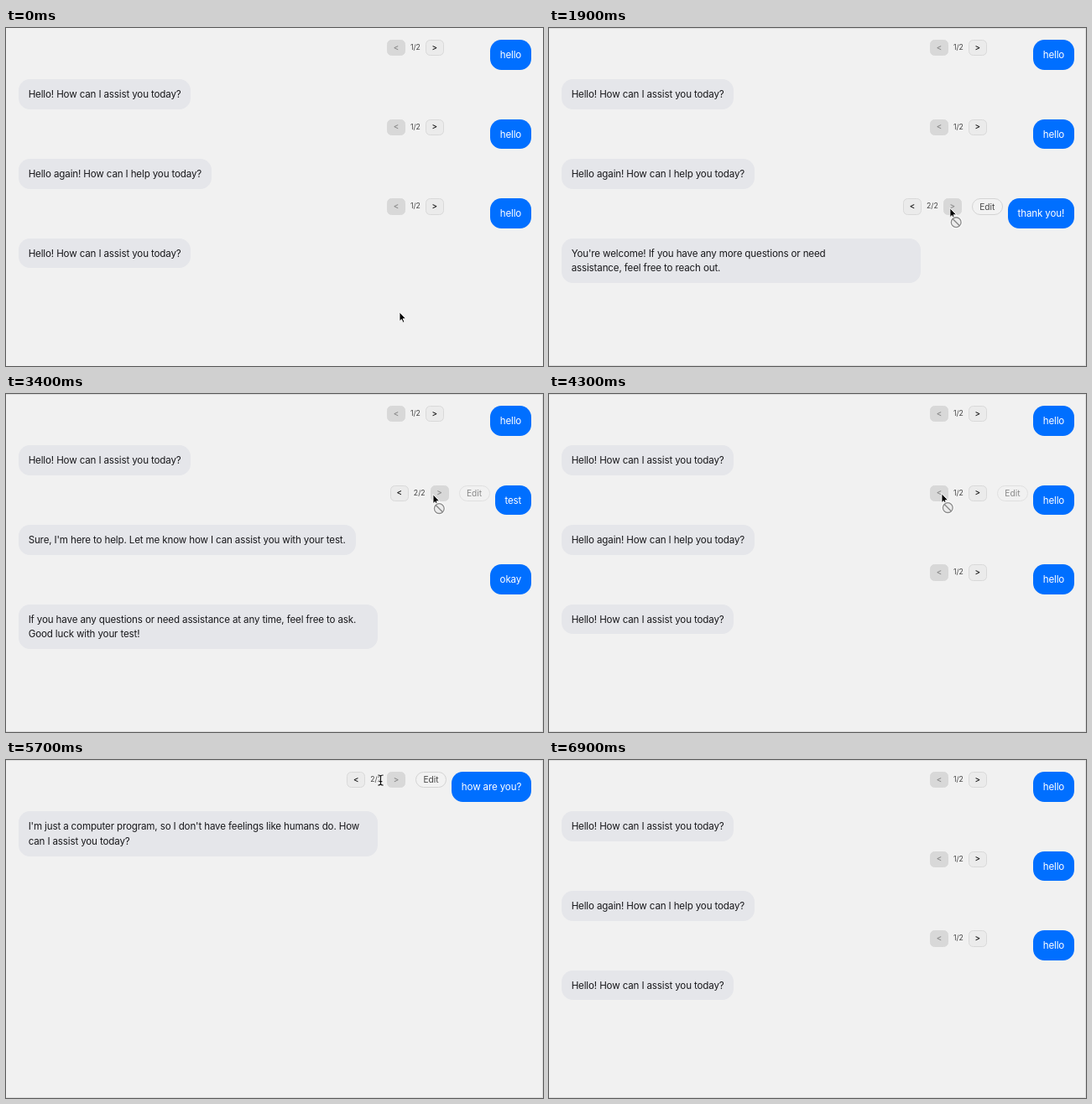
An HTML page that plays this animation: 640 by 403 pixels, repeating every 7700 ms.

```html
<!DOCTYPE html>
<html lang="en">
<head>
<meta charset="utf-8">
<title>Chat branches</title>
<style>
  html, body { margin: 0; width: 100%; height: 100%; overflow: hidden; }
  body { position: relative; background: #f1f1f1; color: #18181b; font: 11.6px/17.76px Inter, sans-serif; letter-spacing: -.0127em; cursor: default; }
  #chat { box-sizing: border-box; width: 640px; height: 403px; padding: 14px 14px 0 14.8px; }
  #chat.framed { box-shadow: inset -1px 1px #dcdcdc, inset 0 -1px #dcdcdc; }
  .mine, .reply { width: max-content; margin-bottom: 11.84px; }
  .mine { display: flex; align-items: flex-start; margin-left: auto; }
  .bubble { box-sizing: border-box; padding: 9.88px 11.84px 7.88px; border-radius: 13.4px; white-space: pre; }
  .mine .bubble { background: #006fff; color: #fff; }
  .reply { background: #e5e6ea; }
  .reply.wide { width: 428px; }
  button { box-sizing: border-box; height: 19.2px; padding: 0; border: 1px solid #d9d9d9; background: #ebebeb; color: #111; font: 500 9.8px/1 Inter, sans-serif; }
  .step { width: 22px; border-radius: 5.5px; }
  .step.hover { background: #d9d9d9; border-color: #d2d2d2; }
  .step:disabled { background: #d8d8d8; border-color: #d8d8d8; color: #878787; }
  .count { margin: 0 6px; font-size: 8.7px; line-height: 19.2px; letter-spacing: 0; color: #444; }
  .edit { width: 37px; margin: 0 6px 0 12px; border-color: #d4d4d4; border-radius: 10px; background: #f2f2f2; color: #444; font-weight: 400; font-size: 10.2px; opacity: 0; }
  #pointer { position: absolute; left: 0; top: 0; width: 1px; height: 1px; overflow: visible; pointer-events: none; }
</style>
</head>
<body>
<div id="chat"></div>
<svg id="pointer" fill="none" stroke-linejoin="round" stroke-linecap="round">
  <g id="arrow">
    <path d="M0 0V10.6L2.4 8.4L4.1 12.2L5.9 11.4L4.2 7.7H7.4Z" fill="#000" stroke="#fff" stroke-width=".9"/>
    <g id="denied">
      <circle cx="7.3" cy="16.6" r="5.9" stroke="#fff" stroke-width="3.2"/>
      <circle cx="7.3" cy="16.6" r="5.9" fill="#ececec" stroke="#8a8a8a" stroke-width="1.3"/>
      <path d="M3.4 12.7L11.2 20.5" stroke="#8a8a8a" stroke-width="1.4"/>
    </g>
  </g>
  <path id="hand" d="M-1.3 8V1.2Q-1.2 0 0 0Q1.2 0 1.3 1.2V5Q2.6 4 3.6 5.3Q5 4.6 5.8 6Q7.4 5.5 7.6 7.2V9.6Q7.4 11.2 6.4 12.6V13.4H.2Q-.6 11.8 -2 10.3Q-3.8 8 -4 7.2Q-3.8 5.7 -2.4 6.6ZM1.6 9V11.6M3.4 9V11.6M5.2 9V11.6" fill="#fff" stroke="#111" stroke-width=".95"/>
  <g id="beam">
    <defs><path id="beamShape" d="M-2.8 -6Q0 -6 0 -4.3Q0 -6 2.8 -6M0 -4.3V4.3M-2.8 6Q0 6 0 4.3Q0 6 2.8 6M-1.5 1.6H1.5"/></defs>
    <use href="#beamShape" stroke="#fff" stroke-width="2.4"/>
    <use href="#beamShape" stroke="#111" stroke-width="1.2"/>
  </g>
</svg>
<script>
const LOOP = 7700, TICK = 100;
const $ = id => document.getElementById(id);
const chat = $('chat');

// Each turn: message, reply, branch shown (0 = no pager).
const first = ['hello', 'Hello! How can I assist you today?', 1];
const second = ['hello', 'Hello again! How can I help you today?', 1];
const base = [first, second, first];
const thanks = [first, second, ['thank you!',
  "You're welcome! If you have any more questions or need\nassistance, feel free to reach out.", 2]];
const test = [first,
  ['test', "Sure, I'm here to help. Let me know how I can assist you with your test.", 2],
  ['okay', 'If you have any questions or need assistance at any time, feel free to ask.\nGood luck with your test!', 0]];
const how = [['how are you?',
  "I'm just a computer program, so I don't have feelings like humans do. How\ncan I assist you today?", 2]];

const scenes = [[0, base], [1500, thanks], [2400, base], [3400, test], [4300, base], [5200, how], [6300, base]];

// Pointer stops: time, x, y.
const stops = [
  [700, 469, 339], [1400, 511, 221], [1600, 509, 217], [2300, 430, 212], [2500, 430, 212],
  [3200, 509, 120], [3400, 509, 120], [4000, 468, 119], [4300, 468, 119], [5000, 508, 28],
  [5200, 508, 28], [5700, 446.5, 24], [6100, 418, 24], [6300, 418, 24], [6900, 432, -24]
];

const pager = branch => `
  <button class="step" ${branch === 1 ? 'disabled' : ''}>&lt;</button>
  <span class="count">${branch}/2</span>
  <button class="step" ${branch === 2 ? 'disabled' : ''}>&gt;</button>`;

const turn = ([message, reply, branch]) => `
  <div class="mine">${branch ? pager(branch) : ''}<button class="edit">Edit</button><div class="bubble">${message}</div></div>
  <div class="reply bubble ${reply.includes('\n') ? 'wide' : ''}">${reply}</div>`;

const lastBefore = (list, t) => list.filter(item => item[0] <= t).pop();

function pointerAt(t) {
  const from = lastBefore(stops, t) || stops[0];
  const to = stops[stops.indexOf(from) + 1];
  if (!to || t <= from[0]) return from.slice(1);
  const u = (t - from[0]) / (to[0] - from[0]);
  const k = u * u * (3 - 2 * u);
  return [from[1] + (to[1] - from[1]) * k, from[2] + (to[2] - from[2]) * k];
}

function pointerKind(target) {
  if (!target) return 'arrow';
  if (target.matches(':disabled')) return 'denied';
  if (target.matches('button')) return 'hand';
  return target.matches('.count, .bubble') ? 'beam' : 'arrow';
}

const show = (id, visible) => { $(id).style.display = visible ? '' : 'none'; };

let shown;
function render(t) {
  const scene = lastBefore(scenes, t);
  if (scene !== shown) {
    chat.innerHTML = scene[1].map(turn).join('');
    shown = scene;
  }
  chat.classList.toggle('framed', t >= 800);

  const [x, y] = pointerAt(t);
  const target = document.elementFromPoint(x, y);
  const row = target && target.closest('.mine');
  const fade = Math.min(1, .6 + (t - scene[0]) / 200);
  chat.querySelectorAll('.edit').forEach(edit => { edit.style.opacity = edit.parentNode === row ? fade : 0; });
  chat.querySelectorAll('.step').forEach(step => step.classList.toggle('hover', step === target));

  const kind = pointerKind(target);
  show('arrow', kind === 'arrow' || kind === 'denied');
  show('denied', kind === 'denied');
  show('hand', kind === 'hand');
  show('beam', kind === 'beam');
  $('pointer').style.transform = `translate(${x}px, ${y}px)`;
}

const start = performance.now();
function frame() {
  const t = (performance.now() - start) % LOOP;
  render(Math.floor(t / TICK) * TICK);
  requestAnimationFrame(frame);
}
frame();
</script>
</body>
</html>
```
